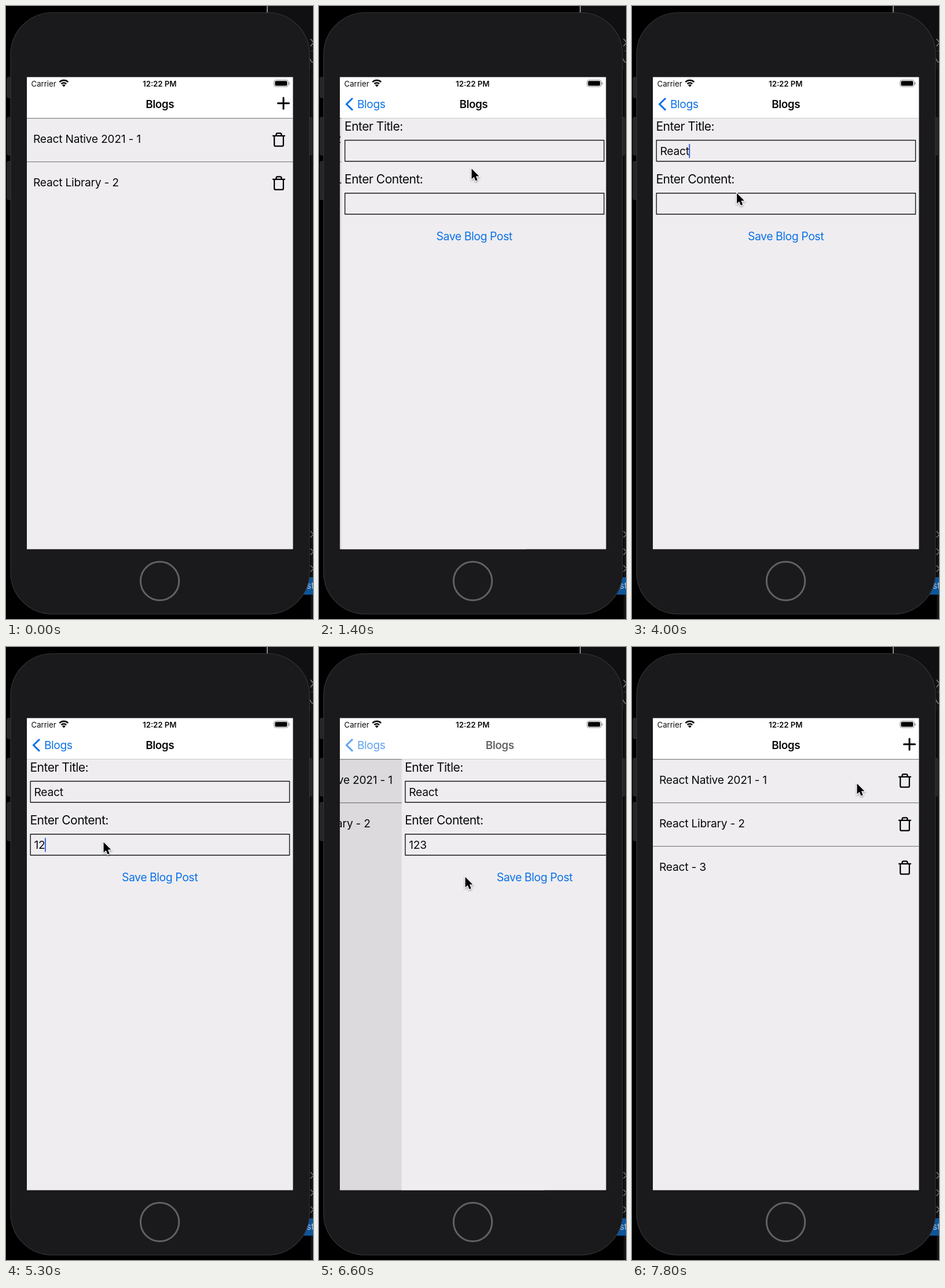
Animation, 530 px wide and 1057 px high, one loop 8 s. Source, as an HTML page with a canvas:

```html
<!DOCTYPE html>
<html lang="en">
<head>
<meta charset="utf-8">
<title>Blogs</title>
<style>
  html, body { margin: 0; width: 100%; height: 100%; overflow: hidden; background: #000; }
  canvas { display: block; width: 530px; height: 1057px; }
</style>
</head>
<body>
<canvas id="stage" width="530" height="1057"></canvas>
<script>
const ctx = document.getElementById('stage').getContext('2d');
const LOOP = 8000, STEP = 100;
const SCREEN = { x: 36, y: 122.5, w: 459.5, h: 814, bar: 193.5 };
const BLUE = '#0a72e8', INK = '#09090b', PAPER = '#efedf0';

// Pointer stops: time, x, y
const POINTER = [
  [400, 492, 140], [500, 474, 164], [1100, 474, 164], [1400, 263, 280],
  [1500, 263, 280], [1900, 248, 248], [3700, 248, 248], [4100, 168, 336],
  [5800, 168, 336], [6200, 252, 396], [6950, 252, 396], [7200, 303, 216],
  [7300, 303, 216], [7500, 447, 222], [7800, 388, 235]
];
const TITLE_KEYS = [2300, 2500, 2600, 2700, 3000];
const CONTENT_KEYS = [5000, 5200, 5500];

const between = (t, a, b) => t >= a && t < b;
const clamp = v => Math.min(1, Math.max(0, v));
const lerp = (a, b, k) => a + (b - a) * k;
const typed = (word, keys, t) => word.slice(0, keys.filter(k => t >= k).length);

// Critically damped spring from 0 to 1
function spring(ms) {
  const u = Math.max(0, ms) / 1000 * Math.sqrt(1000 / 3);
  return ms > 480 ? 1 : 1 - (1 + u) * Math.exp(-u);
}

function pointerAt(t) {
  if (t < POINTER[0][0]) return null;
  for (let i = 1; i < POINTER.length; i++) {
    const a = POINTER[i - 1], b = POINTER[i];
    if (t <= b[0]) {
      const u = (t - a[0]) / (b[0] - a[0]), k = u * u * (3 - 2 * u);
      return [lerp(a[1], b[1], k), lerp(a[2], b[2], k)];
    }
  }
  return POINTER[POINTER.length - 1].slice(1);
}

function rect(x, y, w, h, color) {
  ctx.fillStyle = color;
  ctx.fillRect(x, y, w, h);
}

function round(x, y, w, h, r, fill, line, width = 1) {
  ctx.beginPath();
  ctx.roundRect(x, y, w, h, r);
  if (fill) { ctx.fillStyle = fill; ctx.fill(); }
  if (line) { ctx.strokeStyle = line; ctx.lineWidth = width; ctx.stroke(); }
}

function stroke(d, color, width, cap = 'round') {
  ctx.strokeStyle = color;
  ctx.lineWidth = width;
  ctx.lineCap = cap;
  ctx.lineJoin = cap === 'round' ? 'round' : 'miter';
  ctx.stroke(new Path2D(d));
}

function text(str, x, y, size, { color = INK, weight = 400, track = 0, align = 'left' } = {}) {
  ctx.font = `${weight} ${size}px Inter, "Open Sans", sans-serif`;
  ctx.letterSpacing = track + 'px';
  ctx.textAlign = align;
  ctx.fillStyle = color;
  ctx.fillText(str, x, y);
  return ctx.measureText(str).width;
}

function group(x, y, alpha, draw) {
  ctx.save();
  ctx.translate(x, y);
  ctx.globalAlpha *= alpha;
  draw();
  ctx.restore();
}

function drawDesktop() {
  rect(0, 0, 530, 1057, '#000');
  rect(452, 0, 78, 110, '#101012');
  rect(450, 0, 2, 12, '#8a8a8c');
  rect(526, 60, 4, 997, '#141416');
  rect(526, 77, 4, 1, '#454547');
  rect(514, 985, 16, 30, '#0e5599');
  text('st', 519, 1005, 15, { color: '#a9c4de' });
  stroke('M526 57l5 6l-5 6 M525 91q2 7 6 6', '#8b8b8d', 1.2);
  for (const y of [911, 941, 970]) stroke(`M526 ${y - 5}l5 5l-5 5`, '#8b8b8d', 1.2);
}

function drawPhone() {
  for (const [y, h] of [[123, 35], [192, 65], [268, 66]]) round(2, y, 9, h, 2, '#252427', '#333235');
  round(519, 192, 9, 65, 2, '#252427', '#333235');
  round(8, 11.5, 516, 1037, 72, '#1a191b', '#353437', 1.2);
  ctx.beginPath();
  ctx.arc(265.5, 991.5, 33.2, 0, Math.PI * 2);
  ctx.strokeStyle = '#626164';
  ctx.lineWidth = 3;
  ctx.stroke();
}

function drawStatus() {
  text('Carrier', 43.5, 138.5, 13.2);
  text('12:22 PM', 265.3, 138.5, 13.2, { weight: 600, align: 'center' });
  for (const r of [11.5, 7]) {
    ctx.beginPath();
    ctx.arc(99.8, 138.5, r - 1, -Math.PI * 0.75, -Math.PI * 0.25);
    ctx.strokeStyle = '#000';
    ctx.lineWidth = 2.6;
    ctx.lineCap = 'butt';
    ctx.stroke();
  }
  ctx.beginPath();
  ctx.moveTo(99.8, 139.5);
  ctx.arc(99.8, 139.5, 4.2, -Math.PI * 0.75, -Math.PI * 0.25);
  ctx.fillStyle = '#000';
  ctx.fill();
  round(462.7, 127.7, 24.6, 11.4, 3.2, null, '#8d8d8f');
  round(464.4, 129.3, 21, 8.2, 1.8, '#000');
  round(488.2, 131.3, 1.4, 4.4, 0.7, '#8d8d8f');
}

function drawTrash(y) {
  group(471 - 12 * 1.12, y - 12 * 1.12, 1, () => {
    ctx.scale(1.12, 1.12);
    stroke('M3 6H21 M19 6v14a2 2 0 0 1-2 2H7a2 2 0 0 1-2-2V6 M8 6V4a2 2 0 0 1 2-2h4a2 2 0 0 1 2 2v2', '#000', 2);
  });
}

function drawList(rows) {
  rect(36, SCREEN.bar, SCREEN.w, 744, PAPER);
  rows.forEach((name, i) => {
    const y = SCREEN.bar + i * 75;
    rect(36, y - 0.5, SCREEN.w, 1.2, '#807f83');
    text(name, 47, y + 42.5, 19.2, { track: -0.24 });
    drawTrash(y + 37);
  });
}

function drawField(label, value, y, caret) {
  text(label, 41.5, y - 17, 21, { track: -0.5 });
  ctx.strokeStyle = '#161618';
  ctx.lineWidth = 1.4;
  ctx.strokeRect(42.2, y, 447.3, 36.3);
  const w = text(value, 48.5, y + 25, 19.2, { track: -0.24 });
  if (caret) group(0, 0, caret, () => rect(48.5 + (value ? w - 0.6 : 0), y + 6.5, 2, 24, '#3f66dc'));
}

function caretAlpha(t, start, fades, end) {
  if (!between(t, start, end)) return 0;
  const [off, on] = fades;
  return t < off ? 1 : t < off + STEP ? 0.45 : t < on ? 0 : 1;
}

function drawForm(t) {
  rect(36, SCREEN.bar, SCREEN.w, 744, PAPER);
  drawField('Enter Title:', typed('React', TITLE_KEYS, t), 231.5, caretAlpha(t, 2000, [3400, 3900], 4100));
  drawField('Enter Content:', typed('123', CONTENT_KEYS, t), 322.7, caretAlpha(t, 4100, [6000, 6900], 6400));
  group(0, 0, between(t, 6400, 6600) ? 0.3 : 1, () =>
    text('Save Blog Post', 265.5, 404, 19.4, { color: BLUE, track: -0.43, align: 'center' }));
}

function drawHeader(t, p) {
  const title = { weight: 600, track: -0.4, align: 'center' };
  rect(36, SCREEN.y, SCREEN.w, SCREEN.bar - SCREEN.y - 0.5, '#fff');
  drawStatus();
  group(-170 * p, 0, clamp(1 - p * 1.6), () => text('Blogs', 265.7, 176, 18.8, title));
  group(200 * (1 - p), 0, clamp(p * 1.6 - 0.6), () => text('Blogs', 265.7, 176, 18.8, title));
  const back = clamp(p * 1.5 - 0.5) + (p > 0 && p < 0.02 ? 0.02 : 0);
  if (back) group(0, 0, back, () => {
    stroke('M58 159L47.5 169.3L58 179.6', BLUE, 3, 'butt');
    text('Blogs', 66, 176, 19.2, { color: BLUE, track: -0.43 });
  });
  const pressed = between(t, 700, 1000) ? 0.35 : 1;
  group(0, 0, clamp(1 - p * 1.5) * pressed, () => stroke('M469.5 167.8H488.5 M479 158.3V177.3', '#000', 3));
}

function drawPointer(pos) {
  if (!pos) return;
  group(pos[0], pos[1], 1, () => {
    const arrow = new Path2D('M0.5 0.5V18.5L4.6 14.7L7.4 21.6L10.7 20.2L7.9 13.5H13.4Z');
    ctx.shadowColor = 'rgba(0,0,0,.35)';
    ctx.shadowBlur = 3;
    ctx.shadowOffsetY = 1.5;
    ctx.lineWidth = 2.4;
    ctx.lineJoin = 'miter';
    ctx.strokeStyle = '#fff';
    ctx.stroke(arrow);
    ctx.shadowColor = 'transparent';
    ctx.fillStyle = '#000';
    ctx.fill(arrow);
  });
}

function draw(t) {
  // 0 shows the list, 1 the form
  const p = spring(t - 1000) - spring(t - 6550);
  const rows = ['React Native 2021 - 1', 'React Library - 2'];
  if (t >= 7000) rows.push('React - 3');

  drawDesktop();
  drawPhone();
  ctx.save();
  ctx.beginPath();
  ctx.rect(SCREEN.x, SCREEN.y, SCREEN.w, SCREEN.h);
  ctx.clip();
  rect(SCREEN.x, SCREEN.y, SCREEN.w, SCREEN.h, PAPER);
  drawHeader(t, p);
  rect(36, SCREEN.bar - 0.5, SCREEN.w, 1, '#c9c8cb');
  if (p < 1) {
    group(-0.3 * SCREEN.w * p, 0, 1, () => drawList(rows));
    if (p > 0) rect(36, SCREEN.bar + 0.5, SCREEN.w, 744, `rgba(0,0,0,${0.1 * p})`);
  }
  if (p > 0) group(SCREEN.w * (1 - p), 0, 1, () => {
    drawForm(t);
    rect(36, SCREEN.bar - 0.5, SCREEN.w, 1, '#c9c8cb');
  });
  ctx.restore();
  drawPointer(pointerAt(t));
}

const start = performance.now();
function tick() {
  const t = (performance.now() - start) % LOOP;
  draw(Math.floor(t / STEP) * STEP);
  requestAnimationFrame(tick);
}
tick();
</script>
</body>
</html>
```
